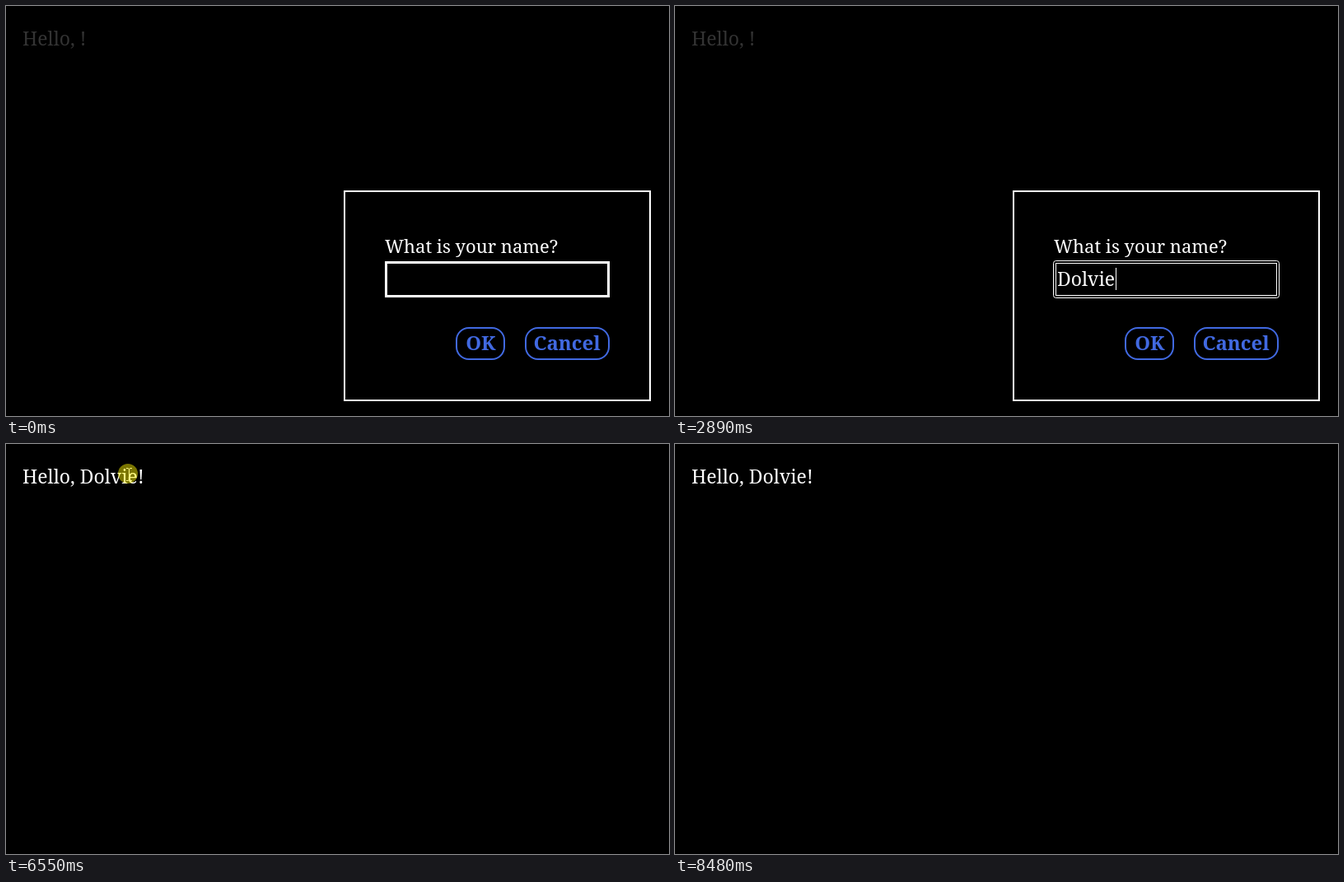
Recreate the animation shown at these times as an HTML page. Size 805 by 498 pixels, loop 8.81 s.

```html
<!DOCTYPE html>
<html lang="en">
<head>
<meta charset="utf-8">
<title>Name prompt</title>
<style>
  html, body { margin: 0; width: 100%; height: 100%; overflow: hidden; background: #000; }
  svg { display: block; width: 805px; height: 498px; font: 22px "Noto Serif", serif; fill: #fff; }
  #greeting, #entry { font-size: 23px; }
  .line { fill: none; stroke: #fff; }
  .button { fill: #4169e1; font-size: 24px; font-weight: bold; text-anchor: middle; }
  .button rect { fill: none; stroke: #4169e1; stroke-width: 2; }
  .button.hover { fill: #00bfff; }
  .button.hover rect { stroke: #00bfff; }
</style>
</head>
<body>
<svg viewBox="0 0 805 498">
  <text id="greeting" x="20" y="48"></text>

  <g id="dialog">
    <rect class="line" x="411" y="225" width="371" height="254" stroke-width="2"/>
    <text x="460" y="300">What is your name?</text>
    <rect id="plainField" class="line" x="461.5" y="311.5" width="270" height="41" stroke-width="3"/>
    <g id="focusedField" class="line">
      <rect x="459.5" y="309.5" width="274" height="45" rx="3"/>
      <rect x="462.5" y="312.5" width="268" height="39"/>
    </g>
    <text id="entry" x="464" y="340"></text>
    <rect id="caret" y="318" width="1" height="27"/>
    <g id="ok" class="button">
      <rect x="547" y="391" width="58" height="38" rx="15"/>
      <text x="576.5" y="418">OK</text>
    </g>
    <g class="button">
      <rect x="631" y="391" width="101" height="38" rx="15"/>
      <text x="681" y="418">Cancel</text>
    </g>
  </g>

  <g id="pointer">
    <path id="arrow" d="M0 0V16L3.7 12.6 6.3 18 8.6 17 6.2 11.6H11Z"/>
    <path id="beam" class="line" d="M-3 -7.5H-1L.5 -6.5 2 -7.5H4M.5 -6.5V6.5M-3 7.5H-1L.5 6.5 2 7.5H4"/>
    <path id="hand" stroke="#000" stroke-width=".6" d="M-1.5 1.5Q0 -1 2 1.5V7Q4 5.500 5 8Q7 6.500 8 9Q11 8 11 11V15Q10 18 9 19V22H0V19L-6 12Q-5.500 9 -3 11L-1.500 13Z"/>
  </g>
  <circle id="press" r="12" fill="#fff500" opacity=".48"/>
</svg>

<script>
const LOOP = 8810, STEP = 70, CLOSE = 4310;
const NAME = "Dolvie";
const KEY_TIMES = [2160, 2360, 2470, 2580, 2690, 2890];
const FOCUS = 1210;
const PRESSES = [[1210, 1480], [4170, CLOSE], [6210, 7520]];

// Each move: start time, then path points as [step, x, y].
const MOVES = [
  [390, [0, 505, 456], [4, 507, 370], [7, 508, 332]],
  [3680, [0, 512, 338], [4, 550, 400], [6, 561, 420], [9, 561, 419]],
  [5370, [0, 533, 408], [11, 16, 30]],
  [6340, [0, 24, 30], [3, 149, 37], [5, 187, 46], [8, 14, 27], [11, 153, 34]],
  [7240, [0, 100, 50], [1, 28, 80], [3, 50, 124]],
  [7780, [0, 54, 130], [9, 546, 490], [10, 600, 530]]
];

const $ = id => document.getElementById(id);
const show = (id, on) => $(id).style.display = on ? "" : "none";
const between = (value, low, high) => value >= low && value < high;
const inside = ([x, y], left, top, right, bottom) =>
  between(x, left, right) && between(y, top, bottom);

function pointerAt(t) {
  const move = MOVES.findLast(([start]) => t >= start);
  if (!move) return [0, 0];
  const [start, ...points] = move;
  const step = Math.floor((t - start) / STEP);
  const next = points.findIndex(([s]) => s > step);
  if (next < 0) return points.at(-1).slice(1);
  const [s0, x0, y0] = points[next - 1], [s1, x1, y1] = points[next];
  const p = (step - s0) / (s1 - s0);
  return [Math.round(x0 + (x1 - x0) * p), Math.round(y0 + (y1 - y0) * p)];
}

function pointerShape(position, open) {
  if (open && inside(position, 546, 390, 606, 430)) return "hand";
  const overText = open ? inside(position, 460, 310, 733, 354)
                        : inside(position, 20, 26, 166, 54);
  return overText ? "beam" : "arrow";
}

function render(t) {
  const open = t < CLOSE, focused = t >= FOCUS;
  show("dialog", open);
  $("greeting").textContent = `Hello, ${open ? "" : NAME}!`;
  $("greeting").style.fill = open ? "#333" : "#fff";

  if (open) {
    show("plainField", !focused);
    show("focusedField", focused);
    const typed = KEY_TIMES.filter(time => t >= time);
    $("entry").textContent = NAME.slice(0, typed.length);
    const width = typed.length ? $("entry").getComputedTextLength() : 0;
    $("caret").setAttribute("x", 465 + Math.round(width));
    const blinkStart = typed.length ? typed.at(-1) + 30 : 1260;
    show("caret", focused && Math.floor((t - blinkStart) / 500) % 2 < 1);
  }

  const position = pointerAt(t);
  const shape = pointerShape(position, open);
  show("pointer", between(t, 390, 2360) || between(t, 3680, 8480));
  for (const id of ["arrow", "beam", "hand"]) show(id, id === shape);
  $("pointer").setAttribute("transform", `translate(${position})`);
  $("ok").classList.toggle("hover", shape === "hand");

  show("press", PRESSES.some(([from, to]) => between(t, from, to)));
  $("press").setAttribute("cx", position[0] - 1);
  $("press").setAttribute("cy", position[1] - 1);
}

const origin = performance.now();
function frame() {
  render((performance.now() - origin) % LOOP);
  requestAnimationFrame(frame);
}
frame();
</script>
</body>
</html>
```
